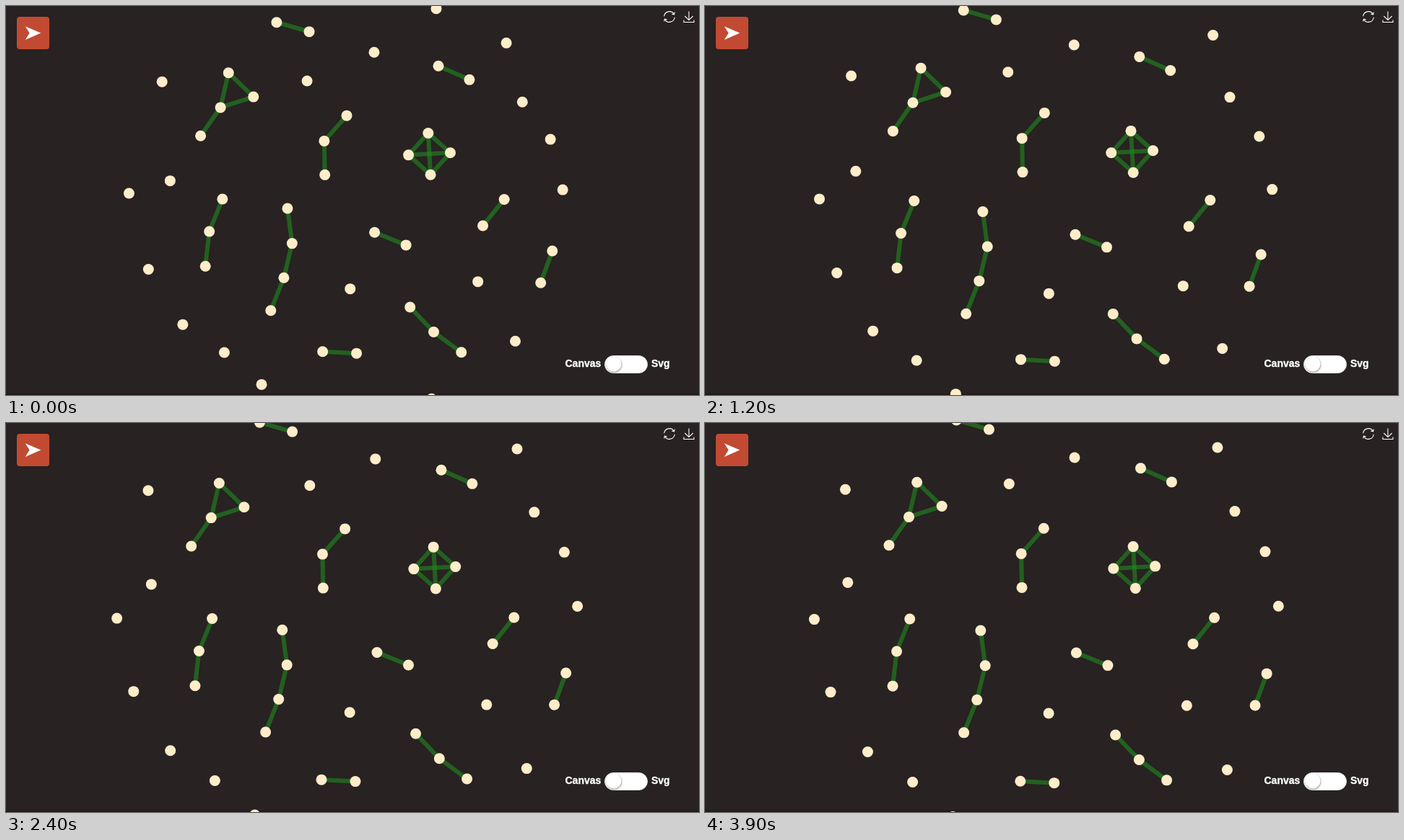
Recreate the animation shown at these times as an HTML page. Size 960 by 540 pixels, loop 8000 ms.

```html
<!DOCTYPE html>
<html lang="en">
<head>
<meta charset="utf-8">
<title>Force layout</title>
<style>
  html, body { margin: 0; width: 100%; height: 100%; overflow: hidden; background: #282222; }
  svg { display: block; }
  #links { stroke: #1f8a1e; stroke-opacity: .6; stroke-width: 6; }
  #nodes { fill: #ffedca; }
  .icon { fill: none; stroke: #fff; stroke-width: 1.1; }
  text { font: bold 14px "Liberation Sans", Helvetica, Arial, sans-serif; fill: #fff; stroke: #fff; stroke-width: .35; }
</style>
</head>
<body>
<svg width="960" height="540" viewBox="0 0 960 540">
  <defs>
    <filter id="shadow" x="-30%" y="-30%" width="160%" height="160%">
      <feDropShadow dx="0.5" dy="1" stdDeviation="1" flood-color="#000" flood-opacity=".55"/>
    </filter>
  </defs>
  <rect width="960" height="540" fill="#282222"/>
  <rect y="538" width="960" height="2" fill="#1f1a1a"/>
  <g id="links"></g>
  <g id="nodes"></g>

  <rect x="15" y="15" width="45" height="45" rx="4" fill="#c24a32"/>
  <path d="M26.7 28.3 48.3 37.6 26.7 47 32.6 37.6z" fill="#fff"/>

  <g class="icon">
    <path d="M911.7 14.2A7.4 7.4 0 0 1 925.4 11.3M926.3 15.8A7.4 7.4 0 0 1 912.6 18.7"/>
    <path d="M926.3 8.6 925.6 11.8 922.4 11.1M911.7 21.4 912.4 18.2 915.6 18.9"/>
    <path d="M946 7.5V19.5M940.3 14 946 19.6 951.7 14M939 19.5V22.5H953V19.5"/>
  </g>

  <text x="774.5" y="501">Canvas</text>
  <rect x="829.5" y="485.5" width="59" height="24" rx="12" fill="#fff" stroke="#e4e4e4"/>
  <circle cx="842" cy="497" r="10.3" fill="#fff" filter="url(#shadow)"/>
  <text x="894" y="501">Svg</text>
</svg>
<script>
const LOOP = 8000, STEP = 100, LAST = 39, COOLING = 0.075;
const CENTER = [485, 265], SPREAD = 0.075, LINK_REACH = 60;

// Resting places of the unlinked nodes.
const loners = [
  [512, 48], [605, -17.5], [710, 34], [734, 122.6], [776, 178.6], [794.4, 254.3],
  [194.4, 92.2], [174, 373.6], [225.4, 456.5], [287.6, 498.5], [343.4, 546.5],
  [476.1, 403], [667.4, 392.2], [723.4, 481.5], [598, 568]
].map(at => ({ at }));

// A chain starts at a point and takes one link per heading, in degrees.
// A push is travel on top of the common spread.
const pieces = [
  ...loners,
  { at: [421.3, 84.5], push: [9, -6] },
  { at: [197.8, 221.4], push: [-8, -18] },
  { at: [151.4, 272.6], push: [6, 12] },
  { at: [348.3, -4], headings: [16], push: [-18, -7] },
  { at: [603.5, 62.8], headings: [24], push: [-6, -6] },
  { at: [705.6, 270.2], headings: [129] },
  { at: [778.2, 347.9], headings: [110] },
  { at: [514.4, 319], headings: [22] },
  { at: [436.8, 497.2], headings: [3] },
  { at: [469.3, 146.2], headings: [131.5, 89] },
  { at: [283.7, 272], headings: [112, 96.5], link: 48.5 },
  { at: [568.6, 433], headings: [46.5, 36.5], link: 47.6 },
  { at: [381.8, 288.1], headings: [82.5, 103.5, 111.7], link: 49 },
  { at: [293.6, 82.2], headings: [44, 162, 125], link: 48 },
  { at: [593.1, 171.6], headings: [41.7, 131.9, 221.9], link: 41 }
];

function set(el, attrs) {
  for (const key in attrs) el.setAttribute(key, attrs[key]);
  return el;
}

function add(parent, tag, attrs = {}) {
  const el = document.createElementNS("http://www.w3.org/2000/svg", tag);
  document.getElementById(parent).append(el);
  return set(el, attrs);
}

function walk([x, y], headings, link) {
  const points = [[x, y]];
  for (const heading of headings) {
    const angle = heading * Math.PI / 180;
    x += link * Math.cos(angle);
    y += link * Math.sin(angle);
    points.push([x, y]);
  }
  return points;
}

// Linked nodes travel together, outward from the centre of the layout.
function build({ at, headings = [], link = 47, push = [0, 0] }) {
  const points = walk(at, headings, link);
  const travel = [0, 1].map(axis => {
    const middle = points.reduce((sum, p) => sum + p[axis], 0) / points.length;
    return SPREAD * (middle - CENTER[axis]) + push[axis];
  });
  return points.map(rest => ({ rest, travel, el: add("nodes", "circle", { r: 7.5 }) }));
}

const nodes = pieces.flatMap(build);
const links = [];
nodes.forEach((a, i) => nodes.slice(i + 1).forEach(b => {
  if (Math.hypot(a.rest[0] - b.rest[0], a.rest[1] - b.rest[1]) < LINK_REACH) {
    links.push({ a, b, el: add("links", "line") });
  }
}));

// Share of the way still to go, falling from 1 to 0 as the layout cools.
function remaining(step) {
  const end = Math.exp(-COOLING * LAST);
  return (Math.exp(-COOLING * step) - end) / (1 - end);
}

function render(time) {
  const left = remaining(Math.min(LAST, Math.floor((time % LOOP) / STEP)));
  for (const node of nodes) {
    [node.x, node.y] = node.rest.map((rest, axis) => rest - node.travel[axis] * left);
    set(node.el, { cx: node.x, cy: node.y });
  }
  for (const { a, b, el } of links) set(el, { x1: a.x, y1: a.y, x2: b.x, y2: b.y });
}

const start = performance.now();
function tick() {
  render(performance.now() - start);
  requestAnimationFrame(tick);
}
tick();
</script>
</body>
</html>
```
